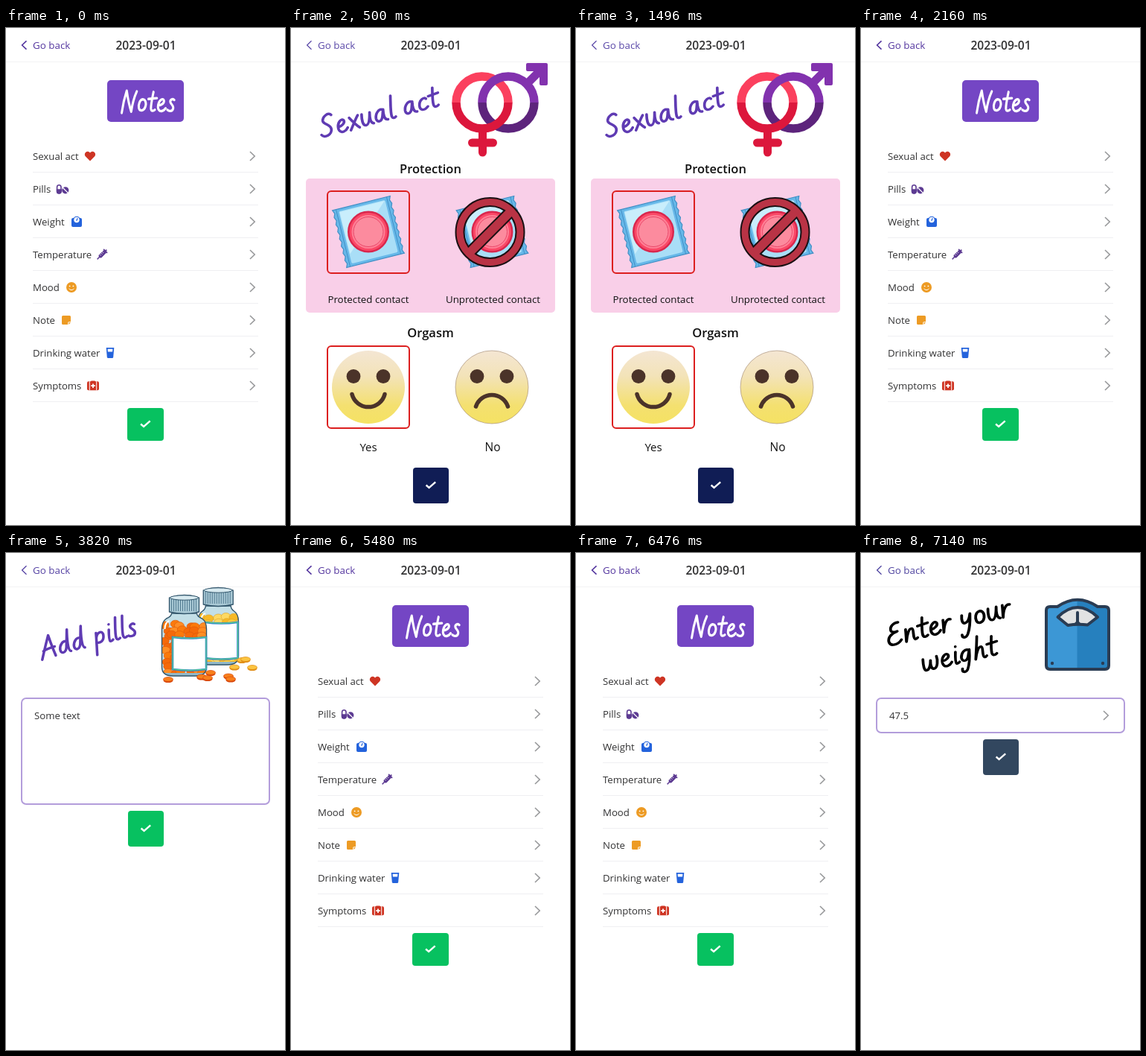
An HTML page for the animation above (8 s loop, 375 by 667 pixels).

```html
<!DOCTYPE html>
<html lang="en">
<head>
<meta charset="utf-8">
<title>Daily notes</title>
<style>
html, body { margin: 0; width: 100%; height: 100%; overflow: hidden; background: #fff; }
svg { display: block; width: 100%; height: 100%; }
text { font: 13.2px "Open Sans", "Noto Sans", sans-serif; fill: #323233; }
.date { font-size: 15.6px; font-weight: 600; }
.head { font-size: 16.5px; font-weight: 600; fill: #111; }
.mid { text-anchor: middle; }
.ink { fill: none; stroke-width: 2; stroke-linecap: round; stroke-linejoin: round; }
</style>
</head>
<body>
<svg id="stage" viewBox="0 0 375 667" preserveAspectRatio="xMidYMid meet"></svg>
<script>
// Brush lettering: [advance, stroke path], baseline at y = 0, x-height 10.
const glyphs = {
  N: [13.5, 'M1 1.5C2-5 3.5-11 5.5-16.5C6.5-10 7.5-5 9.5 .5C10.5-6 12-11 14.5-16'],
  S: [11, 'M11-15.5C9.5-18.5 4.5-16 4-12.5C3.8-9.5 9-8.5 8.5-4.5C8 0 2 1.5 .5-2'],
  A: [13, 'M.8 1C4-6 7-12 9.5-17C10-11 10.5-6 11.5 .3M3.2-5.5C6-6.5 9-6.8 12.3-7'],
  E: [11, 'M10.5-16.5C7-17 4-14.5 4.2-11.5C4.5-9.5 7-9.3 8.5-9.7C4-9.3 .8-6.5 1-3C1.3 1 7 .8 10-2.5'],
  a: [9.5, 'M7.5-8.5C5-11 1.5-7.5 1-3.5C.8 .5 4.5 .5 6-4L7.6-9C6.8-5 6.5-.5 9.3-.3'],
  c: [7.5, 'M7-8.3C6-10.5 2-8.5 1.2-4.5C.5-.5 3.5 1 7-2'],
  d: [9.5, 'M7-8.5C4.5-10.5 1.5-7 1-3.5C.8 .5 4.5 .5 6-4L9.5-18C8-11 6.3-1 8.8-.3'],
  e: [8, 'M1.2-4.5C4-4.5 7-6.5 6.3-8.7C5.5-10.8 2-9 1.2-5C.5-1 2.5 .3 4.3 0C6-.3 7-1.2 7.8-2.3'],
  g: [9, 'M7.5-8.5C5-11 1.5-7.5 1-4C.8 0 4.5 0 6-4L7.8-9C7-3 5.5 3 3.5 6.5C1.5 9-1 7.5 0 5'],
  h: [9, 'M5-18C3.5-11 1.8-5 .6 0C2-5 4.5-10 6.5-9C8-8 5.5-2 7-.4C7.5 0 8.2-.2 9-1'],
  i: [4.5, 'M2.8-9.5C2-6 1-1.5 1.8-.4C2.3 .2 3.5-.3 4.2-1M3.6-13.8v.1'],
  l: [4.8, 'M4.5-18C3-11 1.2-4 1.7-1.5C2.1 .3 3.5 0 4.5-.8'],
  n: [9, 'M2-9.5C1.6-6 1-3 .6 0C2-5 4.5-10 6.5-9C8-8 5.5-2 7-.4C7.5 0 8.2-.2 9-1'],
  o: [8, 'M4.5-9.5C1.5-9 .5-5 1-2.5C1.8 .5 5.5 0 6.8-3.5C8-7 6.5-10 4-9.3'],
  p: [9, 'M3-9.5C2.2-4 1 2 0 8M2.6-6C4-10 8.5-10.8 8-6C7.5-1.5 4-.5 1.8-2'],
  r: [7, 'M2-9.5C1.6-6 1-3 .6 0C2-6 4.5-10 7.2-8.8'],
  s: [6.5, 'M6.5-9C5-10.5 2.5-9 3-7.2C3.5-5.5 6-4.5 5.5-2.2C5 .3 2 .5 .3-1'],
  t: [7, 'M5-15.5C4-11 2.5-5 2.7-2C3 .5 5 0 6.2-1M.5-9.8L8-10.5'],
  u: [9, 'M1.8-9.5C1-6 .3-.5 3-.2C5.5 0 7-6 7.8-9.5C7-6 6.2-1 8.8-.2'],
  w: [12, 'M1.5-9.5C.8-5 .5-.3 2.5-.3C4.5-.3 6-4 6.7-7.5C5.8-3.5 6-.3 8-.3C10.5-.3 12-6 11.5-9.7'],
  x: [8, 'M1.5-9.5C3-6.5 5-2.5 7.2 0M8-9.8C5.5-7 3-3 .5 .5'],
  y: [9, 'M2-9.5C1-6 1-3 3-3C5.5-3 7-6.5 8-9.5C7-4 5.5 2 3 6C1 9-1.5 8-1 5.5'],
};

const text = (x, y, str, attrs = '') => `<text x="${x}" y="${y}" ${attrs}>${str}</text>`;
const path = (d, fill, attrs = '') => `<path d="${d}" fill="${fill}" ${attrs}/>`;
const line = (d, color, width, attrs = '') =>
  path(d, 'none', `stroke="${color}" stroke-width="${width}" ${attrs}`);
const rect = (x, y, w, h, r, fill, attrs = '') =>
  `<rect x="${x}" y="${y}" width="${w}" height="${h}" rx="${r}" fill="${fill}" ${attrs}/>`;
const circle = (x, y, r, fill, attrs = '') =>
  `<circle cx="${x}" cy="${y}" r="${r}" fill="${fill}" ${attrs}/>`;
const group = (transform, body) => `<g transform="${transform}">${body}</g>`;
const ROUND = 'stroke-linecap="round" stroke-linejoin="round"';

function brush(str, x, y, [sx, sy], angle, color) {
  let pen = 0, out = '';
  for (const ch of str) {
    if (ch === ' ') { pen += 5; continue; }
    const [advance, d] = glyphs[ch];
    out += `<path d="${d}" transform="translate(${pen}) scale(.88 1)"/>`;
    pen += advance;
  }
  return `<g class="ink" role="img" aria-label="${str}" stroke="${color}"
    transform="translate(${x} ${y}) rotate(${angle}) scale(${sx} ${sy})">${out}</g>`;
}

const header = (color, width) =>
  line('M0 45.5H375', '#f3f3f4', 1) +
  line('M27.5 17.3L21.6 23L27.5 28.7', color, width) +
  text(36, 28, 'Go back', `style="font-size:13.4px;fill:${color}"`) +
  text(188, 28.7, '2023-09-01', 'class="date mid"');

const arrow = (x, y) => line(`M${x} ${y - 6}l6.2 6l-6.2 6`, '#97989a', 1.6);

const button = (x, y, w, h, color) =>
  rect(x, y, w, h, 4, color) +
  line(`M${x + w / 2 - 6.4} ${y + h / 2 - .5}l4 3.5l8.6-7.6`, '#fff', 2.4);

// Menu icons, drawn around their own centre.
const icons = {
  heart: path('M0 6.5L-6.2 .3C-8.6-2.5-6-6.8-3-6.2C-1.4-6-.5-5 0-4.4C.5-5 1.4-6 3-6.2C6-6.8 8.6-2.5 6.2 .3Z', '#ce3524'),
  pills: rect(-7.4, -5.3, 5.4, 11, 2.7, '#fff', 'stroke="#5c3a92" stroke-width="1.6"') +
    path('M-8.2 .2h7v3a3.5 3.5 0 0 1-7 0Z', '#5c3a92') +
    circle(3.8, 1.8, 4.6, '#5c3a92') + line('M0-2L7.6 5.6', '#fff', 1.3),
  scale: rect(-7, -5, 14, 12, 2, '#2463dc') + circle(0, -2.5, 4.8, '#2463dc') +
    circle(0, -2.5, 3.7, '#fff') + line('M-.3-1.3L1.2-4.8', '#2463dc', 1.3),
  thermometer: group('rotate(45)',
    line('M0 4V9', '#5c3a92', 1.5) + rect(-2.5, -7, 5, 12, 2, '#5c3a92') +
    line('M0-9V-6M-3.5-6.5H3.5', '#5c3a92', 1.7) +
    line('M-2.5-3H0M-2.5-.5H0M-2.5 2H0', '#fff', .8)),
  smile: circle(0, 0, 7, '#ed9b24') + circle(-2.4, -1.6, .9, '#fff') + circle(2.4, -1.6, .9, '#fff') +
    line('M-3.2 2C-1.7 4.2 1.7 4.2 3.2 2', '#fff', 1, ROUND),
  note: path('M-6-4.5Q-6-6-4.5-6H4.5Q6-6 6-4.5V2.2H3.7Q2.2 2.2 2.2 3.7V6H-4.5Q-6 6-6 4.5Z', '#ed9b24') +
    path('M3.3 6V3.3H6Z', '#ed9b24'),
  glass: path('M-5.3-7H5.3L4.2 5.8Q4 7 2.8 7H-2.8Q-4 7-4.2 5.8Z', '#2463dc') +
    path('M-3.4-5.2H3.4L3.1-1.6H-3.1Z', '#fff'),
  kit: rect(-8, -5.8, 16, 12, 2, '#cf3523') + rect(-3, -6.6, 6, 2, 1, '#cf3523') +
    line('M-4.7-5.8V6.2M4.7-5.8V6.2', '#fff', 1) + line('M-2.8 .2H2.8M0-2.6V3', '#fff', 1.8),
};

const menu = [
  ['Sexual act', 'heart', 113], ['Pills', 'pills', 76], ['Weight', 'scale', 95],
  ['Temperature', 'thermometer', 129], ['Mood', 'smile', 88], ['Note', 'note', 81],
  ['Drinking water', 'glass', 140], ['Symptoms', 'kit', 117],
];

function notesScene() {
  const rows = menu.map(([label, icon, x], i) => {
    const y = 172 + 44 * i;
    return text(36, y + 5, label) + group(`translate(${x} ${y})`, icons[icon]) +
      arrow(328, y) + line(`M36 ${y + 21.5}H339`, '#efeff2', 1);
  });
  return header('#54369f', 1.6) + rect(136, 70, 103, 56, 5, '#7446c4') +
    brush('Notes', 154, 111.5, [1.71, 1.66], 0, '#fff') + rows.join('') + button(163, 510, 49, 44, '#07c160');
}

function genderSigns() {
  const half = (x, sweep, color) => line(`M${x - 35} 100A35 35 0 0 ${sweep} ${x + 35} 100`, color, 11.5);
  const pink = '#fb405e', red = '#dc173c', violet = '#8232ae', plum = '#5d247c';
  return half(257, 1, pink) + half(292, 1, violet) + half(292, 0, plum) + half(257, 0, red) +
    line('M257.5 138V167M243.5 154H271.5', red, 11, ROUND) +
    line('M317 75L338 54', violet, 11) +
    path('M318 47H343Q345 47 345 49V75Q345 77 343 77H336Q334 77 334 75V58H318Q316 58 316 56V49Q316 47 318 47Z', violet);
}

function packet(x, y) {
  const teeth = 16, step = 79 / teeth;
  let edge = 'M-40-39.5H40';
  for (let i = 0; i < teeth; i++) edge += `l${i % 2 ? 2 : -2} ${step}`;
  edge += 'H-40';
  for (let i = 0; i < teeth; i++) edge += `l${i % 2 ? -2 : 2} ${-step}`;
  return group(`translate(${x} ${y}) rotate(-14)`,
    path(edge + 'Z', '#67b8e9', 'stroke="#438fc5" stroke-width="1.2"') +
    rect(-32, -36, 64, 72, 2, '#a9def7') +
    path('M-31-35H31L-31 23Z', '#c9eefc') +
    line('M-35-39V39M35-39V39', '#438fc5', 1)) +
    circle(x, y, 26.5, '#ff7f95', 'stroke="#d9274d" stroke-width="3"') +
    circle(x, y, 24, 'none', 'stroke="#fa4867" stroke-width="3"') +
    circle(x, y, 20, '#fc8b9e', 'stroke="#e9486a" stroke-width="1"');
}

function banSign(x, y) {
  const ring = (color, width) => circle(x, y, 40.5, 'none', `stroke="${color}" stroke-width="${width}"`);
  const bar = (color, width) => line(`M${x - 28} ${y + 28}L${x + 28} ${y - 28}`, color, width);
  return ring('#191013', 13) + bar('#191013', 15.5) + ring('#b93345', 9) + bar('#b93345', 11.5);
}

function face(x, mouth, attrs = '') {
  return circle(x, 482, 49, 'url(#skin)', attrs) +
    circle(x - 20, 467.5, 9.4, '#4b3329') + circle(x + 20, 467.5, 9.4, '#4b3329') +
    line(mouth, '#4b3329', 5.5, ROUND);
}

function actScene() {
  const frame = y => rect(49, y, 110, 110, 5, 'none', 'stroke="#dc1f1f" stroke-width="2"');
  const label = (x, y, str, size) => text(x, y, str, `class="mid" style="font-size:${size}px;fill:#111"`);
  return header('#5a48a8', 1.2) + brush('Sexual act', 41, 147, [2.1, 1.68], -15, '#5f3bb3') + genderSigns() +
    text(187.5, 194.5, 'Protection', 'class="head mid"') +
    rect(20, 202, 335, 180, 5, '#f9cfe8') +
    packet(104, 273.5) + frame(219) + packet(270.5, 273.5) + banSign(267.5, 274) +
    label(104, 369, 'Protected contact', 13.3) + label(271.5, 369, 'Unprotected contact', 13.3) +
    text(187.5, 415, 'Orgasm', 'class="head mid"') +
    frame(427) + face(104, 'M82 491.5A22.7 22.7 0 0 0 126 491.5') +
    face(270, 'M248.5 508A22.7 22.7 0 0 1 291.5 508', 'stroke="#a9927d" stroke-width=".7"') +
    label(104, 568, 'Yes', 15) + label(271, 568, 'No', 15.5) +
    button(164, 590, 48, 48, '#101d55');
}

function seeded(seed) {
  return () => (seed = seed * 16807 % 2147483647) / 2147483647;
}

function bottle(id, x, y, w, h, colors, label) {
  const rnd = seeded(71 + x * 2), dark = '#31556b', c = x + w / 2;
  const body = `M${c - 17} ${y + 25}Q${c - 17} ${y + 29} ${x + 6} ${y + 32}Q${x} ${y + 36} ${x} ${y + 46}V${y + h - 12}` +
    `Q${x} ${y + h} ${x + 15} ${y + h}H${x + w - 15}Q${x + w} ${y + h} ${x + w} ${y + h - 12}V${y + 46}` +
    `Q${x + w} ${y + 36} ${x + w - 6} ${y + 32}Q${c + 17} ${y + 29} ${c + 17} ${y + 25}Z`;
  let pills = '';
  for (let py = y + 39; py < y + h; py += 7)
    for (let px = x + 3; px < x + w; px += 10)
      pills += `<ellipse cx="${px + rnd() * 7}" cy="${py + rnd() * 4}" rx="6.5" ry="5"
        fill="${colors[Math.floor(rnd() * 3)]}" stroke="${colors[3]}" stroke-width=".6"/>`;
  let ribs = '';
  for (let px = c - 17; px < c + 18; px += 3) ribs += `M${px} ${y + 5}V${y + 22}`;
  const [lx, ly, lw, lh] = label, right = lx + lw, low = ly + lh;
  const sticker = `M${lx} ${ly}Q${lx + lw / 2} ${ly + 3} ${right} ${ly}V${low - 2}Q${lx + lw / 2} ${low + 1} ${lx} ${low - 2}Z`;
  return `<clipPath id="${id}"><path d="${body}"/></clipPath>` + path(body, '#c3dfe7') +
    `<g clip-path="url(#${id})">${pills}${rect(x + 2, y + h - 4, w - 4, 5, 2, '#91b8c8')}</g>` +
    line(body, dark, 1.4) + line(`M${x + 4} ${y + 46}Q${x + 4} ${y + 37} ${x + 10} ${y + 35}`, '#fff', 2) +
    path(sticker, '#fff', 'stroke="#2d7fd6" stroke-width="2.6"') + line(sticker, '#5fdc7c', 1) +
    path(`M${c - 20} ${y + 4}Q${c} ${y - 3} ${c + 20} ${y + 4}V${y + 23}Q${c} ${y + 28} ${c - 20} ${y + 23}Z`,
      '#a9c9d5', `stroke="${dark}" stroke-width="1.3"`) +
    line(ribs, '#527b91', 1) +
    `<ellipse cx="${c}" cy="${y + 4}" rx="19" ry="3.2" fill="#d8eaf0" stroke="${dark}" stroke-width="1"/>`;
}

function pillsScene() {
  const orange = ['#fb7a0c', '#f5690a', '#ff8d24', '#d9560b'];
  const yellow = ['#fbca3c', '#f7b926', '#fdd963', '#dba024'];
  const tablet = (x, y, fill, edge) =>
    `<ellipse cx="${x}" cy="${y + 1.4}" rx="6.5" ry="3.2" fill="${edge}"/>
     <ellipse cx="${x}" cy="${y}" rx="6.5" ry="3" fill="${fill}" stroke="${edge}" stroke-width=".7"/>`;
  const spill = [[218, 169.5, 1], [263, 166, 1], [275, 160.5, 1], [271, 167.5, 1], [299, 165, 1], [302, 169, 1],
    [307, 153, 0], [331, 153.5, 0], [317, 143.5, 0], [322, 142.5, 0]];
  return header('#5643a4', 1.3) + brush('Add pills', 47, 142, [2.02, 1.66], -14, '#5f3bb3') +
    bottle('back', 258, 46, 54.5, 104, yellow, [267, 93, 44.5, 50]) +
    bottle('front', 209.5, 56, 60, 109, orange, [224, 113, 45, 45]) +
    spill.map(([x, y, hot]) => tablet(x, y, hot ? '#f8801c' : '#fbc441', hot ? '#d9480c' : '#e08d16')).join('') +
    rect(21, 195, 333, 142, 6, '#fff', 'stroke="#b39ddb" stroke-width="2"') +
    text(38, 223, 'Some text') + button(164, 346, 48, 48, '#07c160');
}

function weightScene() {
  const navy = '#2a3c53';
  const body = 'M254 72H264Q291 53.5 318 72H328Q333 72 333 77V151Q333 156 328 156H254Q249 156 249 151V77Q249 72 254 72Z';
  return header('#4f44a0', 1.3) +
    brush('Enter your', 37, 125, [2.16, 1.7], -14, '#000') + brush('weight', 84, 159, [2.12, 1.66], -13, '#000') +
    path(body, '#3c97d5') +
    path('M290.5 63Q306 63 318 72H328Q333 72 333 77V151Q333 156 328 156H290.5Z', '#2680be') +
    line(body, navy, 4, ROUND) +
    path('M264.5 86Q291 60 318 86L304.5 96.5Q291 95 278 97Z', '#e1e2e3', `stroke="${navy}" stroke-width="4" ${ROUND}`) +
    line('M291 80V94', navy, 4, ROUND) + path('M286.5 97a4.5 5.5 0 0 1 9 0Z', navy) +
    circle(257, 148, 2.2, navy) + circle(325, 148, 2.2, navy) +
    rect(21, 195, 333, 46, 6, '#fff', 'stroke="#b39ddb" stroke-width="2"') +
    text(38, 223, '47.5') + arrow(326, 218) + button(164, 250, 48, 48, '#32475f');
}

const stage = document.getElementById('stage');
const scenes = { notes: notesScene(), act: actScene(), pills: pillsScene(), weight: weightScene() };
stage.innerHTML = `<defs><linearGradient id="skin" x1="0" y1="0" x2="0" y2="1">
  <stop offset="0" stop-color="#f4e6d3"/><stop offset=".35" stop-color="#f3e3b8"/>
  <stop offset=".75" stop-color="#f4e070"/><stop offset="1" stop-color="#f5e263"/></linearGradient></defs>` +
  Object.entries(scenes).map(([name, body]) => `<g id="${name}" visibility="hidden">${body}</g>`).join('');

const LOOP = 8000;
const cuts = [[0, 'notes'], [500, 'act'], [2160, 'notes'], [3820, 'pills'], [5480, 'notes'], [7140, 'weight']];

function render(time) {
  const t = time % LOOP;
  const current = cuts.filter(([start]) => start <= t).pop()[1];
  for (const name in scenes)
    document.getElementById(name).setAttribute('visibility', name === current ? 'visible' : 'hidden');
}

function tick() {
  render(performance.now());
  requestAnimationFrame(tick);
}
tick();
</script>
</body>
</html>
```
